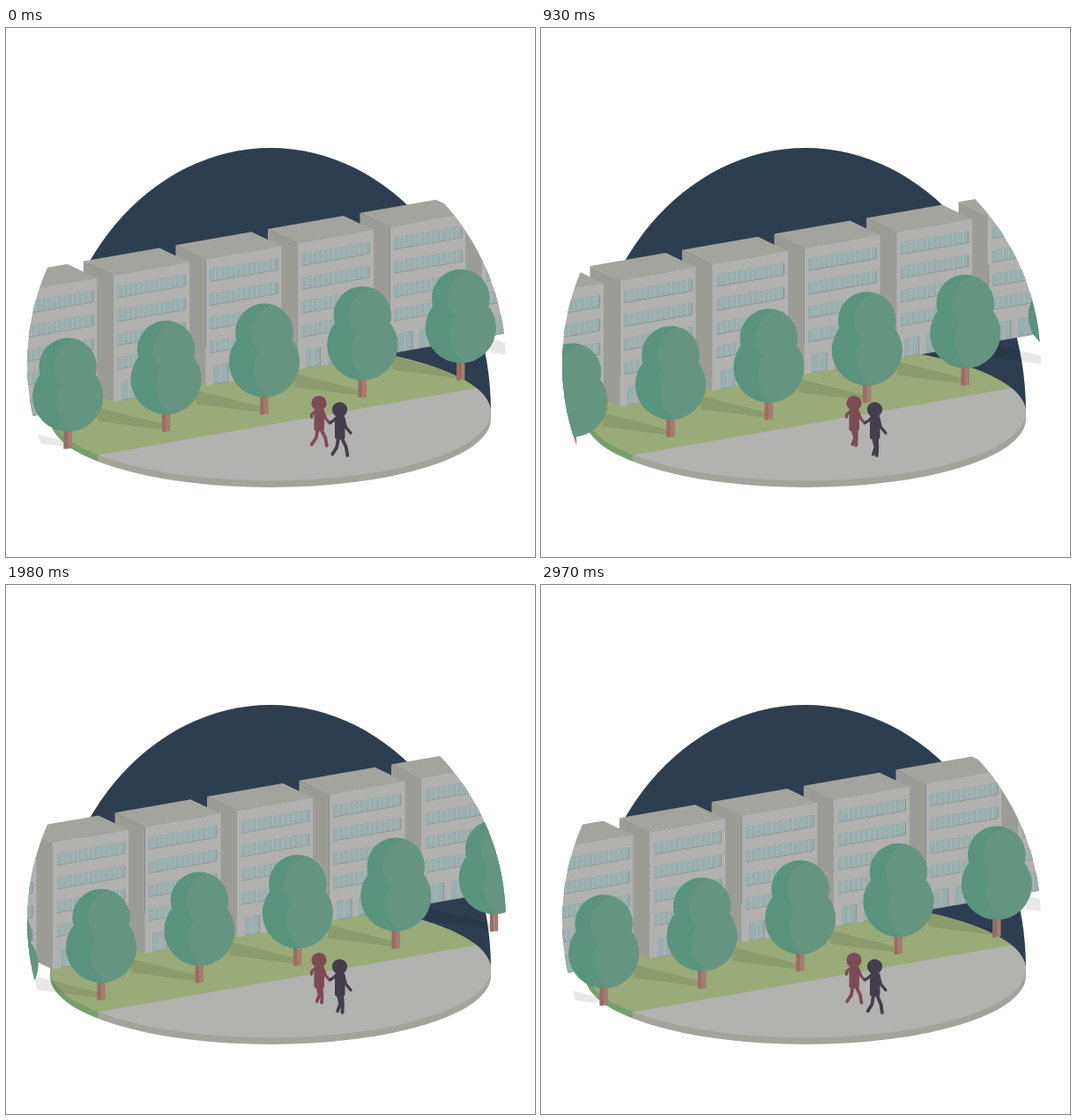
Write an HTML page with a canvas that moves like this. It is 600 by 600 pixels and loops after 3 s.

```html
<!DOCTYPE html>
<html lang="en">
<head>
<meta charset="utf-8">
<title>Evening walk</title>
<style>
  html, body { margin: 0; width: 100%; height: 100%; overflow: hidden; background: #fff; }
  canvas { display: block; }
</style>
</head>
<body>
<canvas id="stage" width="600" height="600"></canvas>
<script>
const ctx = document.getElementById('stage').getContext('2d');
const LOOP = 3000, TAU = 2 * Math.PI;
const SLOPE = 0.1745;                                     // rise of the street
const WIDTH = 86, HEIGHT = 143.5, DEPTH = 34, RISE = 22;  // one building

function rect(color, x, y, w, h) {
  ctx.fillStyle = color;
  ctx.fillRect(x, y, w, h);
}

function oval(color, x, y, rx, ry = rx) {
  ctx.fillStyle = color;
  ctx.beginPath();
  ctx.ellipse(x, y, rx, ry, 0, 0, TAU);
  ctx.fill();
}

function path(...points) {
  ctx.beginPath();
  for (const [x, y] of points) ctx.lineTo(x, y);
}

function poly(color, ...points) {
  ctx.fillStyle = color;
  path(...points);
  ctx.fill();
}

// Draws in a local system whose x axis climbs by `slope`
function at(x, y, slope, draw) {
  ctx.save();
  ctx.transform(1, -slope, 0, 1, x, y);
  draw();
  ctx.restore();
}

function clipOval(x, y, rx, ry, draw) {
  ctx.save();
  ctx.beginPath();
  ctx.ellipse(x, y, rx, ry, 0, 0, TAU);
  ctx.clip();
  draw();
  ctx.restore();
}

function ground() {
  const x = 300, y = 436, rx = 250, ry = 77.5, thick = 7.5, kerb = 104;
  clipOval(x, y, rx, 300, () => rect('#2d3e50', 0, 0, 600, y));
  // The slab's side: a straight band below the widest line, then the lower oval
  const side = () => {
    rect('#75a06e', x - rx, y, kerb - x + rx, 100);
    rect('#a3a39c', kerb, y, x + rx - kerb, 100);
  };
  clipOval(x, y + thick, rx, ry, side);
  ctx.save();
  ctx.beginPath();
  ctx.rect(x - rx, y, 2 * rx, thick);
  ctx.clip();
  side();
  ctx.restore();
  clipOval(x, y, rx, ry, () => {
    rect('#9aaa78', 0, 300, 600, 300);
    at(kerb, 484.5, 0.177, () => rect('#b2b2b1', 0, 0, 500, 150));
  });
}

// A dark recess filled with evenly spaced panes
function glazing(x, y, w, h, panes) {
  const step = w / panes;
  rect('#87918f', x, y, w, h);
  rect('#9aafaf', x, y, w - 1, h - 0.8);
  for (let i = 1; i < panes; i++) rect('#b1b8b6', x + i * step - 0.7, y, 1, h - 0.8);
}

function building(x, y) {
  at(x, y, SLOPE, () => {
    poly('#9c9c97', [0, 0], [-DEPTH, -RISE], [-DEPTH, HEIGHT - RISE], [0, HEIGHT]);
    poly('#a4a49f', [0, 0.3], [-DEPTH, -RISE], [WIDTH - DEPTH, -RISE], [WIDTH, 0.3]);
    rect('#b1b1b0', 0, 0, WIDTH, HEIGHT);
    for (let row = 0; row < 4; row++) glazing(5, 13 + row * 27, 77, 13.6, 13);
    for (const door of [9, 34]) glazing(door, HEIGHT - 21, 17, 21, 2);
  });
}

function shadow(x, y) {
  at(x, y, 0, () => poly('rgba(0,0,0,.09)', [0, -8], [-79, -28], [-77, -12], [0, -2]));
}

function tree(x, y) {
  at(x, y, 0, () => {
    rect('#9a6d63', -4.7, -24, 4.7, 24);
    rect('#a67b70', 0, -24, 4.7, 23.5);
    const crowns = [{ y: -93.3, r: 32.7, lit: [18, -93, 33] }, { y: -59.7, r: 40, lit: [28, -52, 40] }];
    for (const c of crowns) oval('#5a937e', 0, c.y, c.r);
    for (const c of crowns) clipOval(0, c.y, c.r, c.r, () => oval('#659581', ...c.lit));
  });
}

// Repeats a drawing along the street, far end first, one step per loop
function row(draw, x, y, step, p) {
  for (let i = 5; i >= -2; i--) {
    const d = step * (i - p);
    draw(x + d, y - d * SLOPE);
  }
}

function street(p) {
  clipOval(295.5, 381, 271.5, 271.5, () => {
    row(building, 122, 280.5, 104.5, p);
    row(shadow, 181.5, 458, 111.4, p);
    row(tree, 181.5, 458, 111.4, p);
  });
}

// Origin: centre of the head; arms are lists of elbow and hand
function walker(x, y, color, tall, stride, arms) {
  const limb = (width, ...points) => {
    path(...points.map(([px, py]) => [px, py * tall]));
    ctx.lineWidth = width;
    ctx.stroke();
  };
  at(x, y, 0, () => {
    ctx.strokeStyle = color;
    ctx.lineCap = ctx.lineJoin = 'round';
    oval(color, 0, 0, 8.6);
    ctx.beginPath();
    ctx.roundRect(-5.5, 7, 11.5, 25 * tall, 3);
    ctx.fill();
    for (const side of [-1, 1]) {
      limb(3.8, [0.5 + side * 2, 30],
        [2 + side * 5.3 * stride, 39.5],
        [side * (0.7 + 7.8 * stride) + 0.3, 47.5 + side * 0.7]);
      limb(3.2, [side * 4.5, 9.5], ...arms[side < 0 ? 0 : 1]);
    }
  });
}

function walkers(p) {
  const stride = Math.abs(1 - 2 * (p * 2 % 1)) ** 1.3;
  walker(355, 425.5, '#7d4b55', 1, stride, [[[-8.5, 13], [-8.5, 16]], [[8, 18], [12, 22.5]]]);
  walker(378.5, 432.8, '#443d4b', 1.08, stride, [[[-7, 11.5], [-11, 14]], [[7, 18.5], [12.5, 24.7]]]);
}

function frame(now) {
  const p = now % LOOP / LOOP;
  ctx.clearRect(0, 0, 600, 600);
  ground();
  street(p);
  walkers(p);
  requestAnimationFrame(frame);
}
requestAnimationFrame(frame);
</script>
</body>
</html>
```
